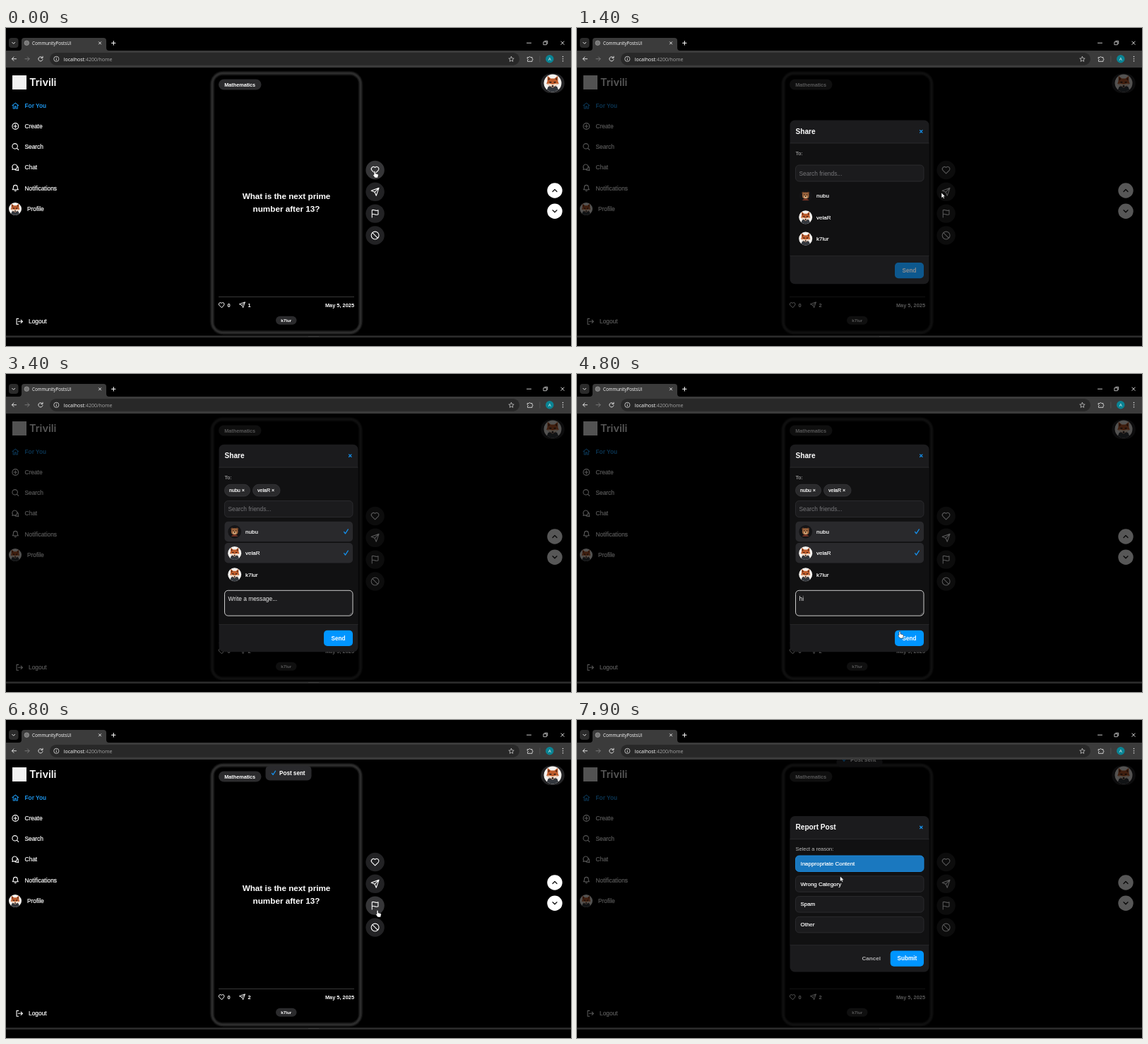
An HTML page that plays this animation: 800 px wide and 450 px high, repeating every 8000 ms.

```html
<!DOCTYPE html>
<html lang="en">
<head>
<meta charset="utf-8">
<title>Share and report a post</title>
<style>
html, body { margin: 0; width: 100%; height: 100%; overflow: hidden; background: #000; }
svg { display: block; width: 100vw; height: 100vh; font-family: "Liberation Sans", Arial, sans-serif; }
text { white-space: pre; }
.medium { stroke: currentColor; stroke-width: .2; color: #fff; }
</style>
</head>
<body>
<svg id="stage" viewBox="0 0 800 450" xmlns="http://www.w3.org/2000/svg"></svg>
<script>
const LOOP = 8000, STEP = 100;
const BLUE = '#0095ff';

// Drawing helpers
const text = (x, y, s, size, fill = '#fff', extra = '') =>
  `<text x="${x}" y="${y}" font-size="${size}" fill="${fill}" ${extra}>${s}</text>`;
const bold = (x, y, s, size, fill = '#fff', extra = '') =>
  text(x, y, s, size, fill, 'font-weight="700" ' + extra);
const medium = (x, y, s, size) => text(x, y, s, size, '#fff', 'class="medium"');
const rect = (x, y, w, h, r, fill, extra = '') =>
  `<rect x="${x}" y="${y}" width="${w}" height="${h}" rx="${r}" fill="${fill}" ${extra}/>`;
const disc = (x, y, r, fill, extra = '') =>
  `<circle cx="${x}" cy="${y}" r="${r}" fill="${fill}" ${extra}/>`;
const line = (d, color = '#fff', w = 1, extra = '') =>
  `<path d="${d}" fill="none" stroke="${color}" stroke-width="${w}" stroke-linecap="round" stroke-linejoin="round" ${extra}/>`;
const group = (id, body) => `<g id="${id}">${body}</g>`;
const MID = 'text-anchor="middle"';

// Icons on a 24 unit grid
const ICONS = {
  home: 'M2 11L12 3L22 11M5 9V21H10V14H14V21H19V9',
  create: 'M12 2A10 10 0 1 0 12 22A10 10 0 1 0 12 2M12 7V17M7 12H17',
  search: 'M10.5 2A8.5 8.5 0 1 0 10.5 19A8.5 8.5 0 1 0 10.5 2M17 17L22 22',
  chat: 'M10 2A8 8 0 0 0 3 14L2 19L7 17.5A8 8 0 1 0 10 2M19 9A7 7 0 0 1 21 17L22 22L17 20.5A8 8 0 0 1 10 19',
  bell: 'M3 17H21C18.5 14.5 18.5 13 18.5 9A6.5 6.5 0 0 0 5.5 9C5.5 13 5.5 14.5 3 17M9.5 20.5Q12 23 14.5 20.5',
  logout: 'M9 3H3V21H9M8 12H22M17 7L22 12L17 17',
  heart: 'M12 21L3.5 12.5A5.5 5.5 0 0 1 12 5.5A5.5 5.5 0 0 1 20.5 12.5Z',
  send: 'M22 2L15 22L11 13L2 9ZM22 2L11 13',
  flag: 'M4 22V3C9 0 13 7 20 3V14C13 18 9 11 4 14',
  block: 'M12 2A10 10 0 1 0 12 22A10 10 0 1 0 12 2M5 5L19 19',
  up: 'M6 15L12 9L18 15',
  down: 'M6 9L12 15L18 9',
  check: 'M4 13L9 20L20 3',
  cross: 'M5 5L19 19M19 5L5 19'
};
const icon = (name, x, y, size, color = '#fff', w = 2) =>
  line(ICONS[name], color, w, `transform="translate(${x - size / 2} ${y - size / 2}) scale(${size / 24})"`);

const fox = (x, y, r) => `<g transform="translate(${x} ${y}) scale(${r / 10})">
  ${disc(0, 0, 10, '#f4f2ef')}
  <path d="M-6.5 7.6L-5 4Q0 1.5 5 4L6.5 7.6Q0 12.4 -6.5 7.6Z" fill="#33373d"/>
  <path d="M-5.8 -8.2L-2 -5.2H2L5.8 -8.2L6 -2L7 .5L0 5.2L-7 .5L-6 -2Z" fill="#bf5c2b"/>
  <path d="M-6.6 .5L-3.4 .6L0 1.4L3.4 .6L6.6 .5L0 5.2Z" fill="#f3dfcc"/>
  <path d="M-5 -6.4L-3 -4.6L-5 -3ZM5 -6.4L3 -4.6L5 -3Z" fill="#4f2618"/>
  <path d="M-4 -1.6H-1.3V-.4H-3.2ZM4 -1.6H1.3V-.4H3.2Z" fill="#24191a"/>
  ${disc(0, 3.4, 1.1, '#24191a')}</g>`;

const bear = (x, y) => `<g transform="translate(${x} ${y})">
  ${disc(0, 0, 9.3, '#141416')}
  <path d="M-5 6.5Q0 1 5 6.5Z" fill="#7b3324"/>
  ${disc(-3.6, -4, 1.7, '#6e4026')}${disc(3.6, -4, 1.7, '#6e4026')}
  ${rect(-4.8, -5, 9.6, 9, 4, '#99623c')}
  ${rect(-2.6, -0.4, 5.2, 3.8, 1.9, '#d5aa7d')}
  ${disc(-2, -1.6, 0.7, '#20140f')}${disc(2, -1.6, 0.7, '#20140f')}${disc(0, 0.7, 0.9, '#20140f')}</g>`;

function browser() {
  return rect(0, 0, 800, 56, 0, '#000') +
    rect(0, 32, 800, 24, 0, '#3b3b3b') +
    rect(4, 14, 13.5, 14, 4, '#2b2b2b') + icon('down', 10.7, 21.3, 8, '#ddd', 3) +
    `<path d="M18 32Q22 32 22 28V18Q22 14 26 14H138Q142 14 142 18V28Q142 32 146 32Z" fill="#3b3b3b"/>` +
    disc(29.3, 21.2, 3.3, '#777', 'stroke="#aaa" stroke-width=".6"') +
    text(37, 23.6, 'CommunityPostsUI', 6.2, '#fff', 'font-family="Open Sans, sans-serif"') +
    icon('cross', 133, 21.3, 5.5, '#eee', 4) +
    line('M149.5 21.2H155M152.25 18.5V24', '#fff', 1.1) +
    line('M737.5 21.2H743.5', '#ddd', .9) +
    line('M761.3 19.7H765.3V23.7H761.3ZM762.7 18.3H766.7V22.3', '#ddd', .8) +
    icon('cross', 788, 21.2, 7.5, '#eee', 2.8) +
    line('M14.5 43.7H8.5M11 41L8.4 43.7L11 46.4', '#ddd', 1) +
    line('M27 43.7H33M30.5 41L33.1 43.7L30.5 46.4', '#777', 1) +
    line('M51.5 42A3.1 3.1 0 1 0 52 44.5M52 40.2V42.5H49.8', '#ddd', 1) +
    rect(62, 35, 665, 17.7, 8.8, '#282828') +
    disc(71.3, 43.8, 3.6, 'none', 'stroke="#ddd" stroke-width=".8"') +
    line('M71.3 43.6V45.5M71.3 41.9V42', '#ddd', .9) +
    `<text x="81.7" y="46.5" font-size="7" fill="#fff" font-family="Open Sans, sans-serif">localhost<tspan fill="#a5a5a5">:4200/home</tspan></text>` +
    line('M715.5 40.4L716.6 42.8L719.2 43.1L717.2 44.8L717.8 47.3L715.5 46L713.2 47.3L713.8 44.8L711.8 43.1L714.4 42.8Z', '#c7c7c7', .8) +
    line('M738.5 41.5H740.5Q741.5 39 742.5 41.5H745V43.5Q747.5 44.3 745 45.5V47.3H738.5V45.3Q740.5 44.4 738.5 43.5Z', '#ddd', .9) +
    rect(755.5, 39.5, .8, 9, 0, '#555') +
    disc(769.8, 43.7, 5.7, '#0a8494') + text(769.8, 45.9, 'A', 6, '#fff', MID) +
    [40.6, 43.7, 46.8].map(y => disc(788.5, y, .8, '#ddd')).join('');
}

function sidebar() {
  const items = [['create', 'Create', 139], ['search', 'Search', 168], ['chat', 'Chat', 197.3], ['bell', 'Notifications', 226.5]];
  return rect(9, 67, 20, 20, 0, '#f2f2f2') +
    text(33, 82, 'Trivili', 14.5, '#fff', 'font-family="Inter, sans-serif" font-weight="600"') +
    icon('home', 13.3, 110, 10.5, '#1d93e8', 2.5) + bold(26.5, 113, 'For You', 8.3, '#1d93e8') +
    items.map(([name, label, y]) => icon(name, 13.3, y, 10.5, '#fff', 2.5) + medium(26.5, y + 3, label, 8.35)).join('') +
    fox(13, 256, 9) + medium(30, 259, 'Profile', 8.35) +
    icon('logout', 19, 415.3, 10.5, '#fff', 2.5) + medium(32, 418.3, 'Logout', 8.4);
}

function card() {
  return `<filter id="soft" x="-10%" y="-10%" width="120%" height="120%"><feGaussianBlur stdDeviation="1"/></filter>` +
    rect(292, 64, 210, 367, 15, 'none', 'stroke="#303030" stroke-width="4" filter="url(#soft)"') +
    rect(301, 72.5, 60.5, 15, 7.5, '#2b2b2d') + bold(331.2, 82.6, 'Mathematics', 7.25, '#fff', MID) +
    bold(397, 242, 'What is the next prime', 11.7, '#fff', MID) +
    bold(397, 259.5, 'number after 13?', 11.7, '#fff', MID) +
    rect(301, 380, 192, .8, 0, '#484848') +
    icon('heart', 305.2, 392, 9.5, '#fff', 2.5) + bold(313.5, 394.6, '0', 7.4) +
    icon('send', 334.5, 392, 9, '#fff', 2.5) + bold(342.5, 394.6, '1', 7.4, '#fff', 'id="count"') +
    bold(493, 394.5, 'May 5, 2025', 7.4, '#fff', 'text-anchor="end"') +
    rect(382, 407.7, 29.5, 12, 6, '#2b2b2d') + bold(396.7, 415.9, 'k7lur', 6.2, '#fff', MID);
}

function actions() {
  return [['heart', 201], ['send', 231.8], ['flag', 262.6], ['block', 293.5]].map(([name, y]) =>
    disc(522.6, y, 13.2, '#222224', `id="btn-${name}"`) + icon(name, 522.6, y, 13, '#fff', 2)).join('') +
    [['up', 230], ['down', 259.3]].map(([name, y]) =>
      disc(777, y, 10.7, '#fff') + icon(name, 777, y, 12, '#111', 2.5)).join('') +
    rect(757.3, 64.5, 33.5, 27.5, 13.7, '#232325') + fox(774, 78, 12.5);
}

// Modal shell: header, body, footer
const shell = (top, bottom, foot, title) =>
  rect(301.5, top, 197, bottom - top, 7, '#1b1b1d') +
  rect(301.5, top + 32.5, 197, foot - top - 32.5, 0, '#111112') +
  rect(301.5, top + 32, 197, .8, 0, '#2e2e30') + rect(301.5, foot, 197, .8, 0, '#28282a') +
  bold(309.5, top + 19.4, title, 10.1) +
  icon('cross', 487.3, top + 15.9, 5.8, '#1594f2', 5);

const button = (x, y, w, label, opacity = 1) =>
  `<g opacity="${opacity}">${rect(x, y, w, 22.3, 5, BLUE) + bold(x + w / 2, y + 14, label, 8.2, '#fff', MID)}</g>`;
const field = (y, h, id = '') =>
  rect(309.5, y, 181.5, h, 5, '#1b1b1d', `stroke="#2d2d30" stroke-width=".9" ${id && `id="${id}"`}`);

function friends(y) {
  return [['nubu', bear], ['velaR', fox], ['k7lur', fox]].map(([name, face], i) => {
    const cy = y + i * 30.3;
    return face(323.7, cy, 9.5) + medium(339, cy + 2.8, name, 8.05);
  }).join('');
}
const picked = cy => rect(309.5, cy - 14.2, 181.5, 28.4, 5, '#29292c');
const tick = cy => icon('check', 481.5, cy, 8.5, '#1594f2', 3.5);
const tag = (x, w, name) =>
  rect(x, 156.3, w, 16.7, 8.3, '#2a2a2c', 'stroke="#3c3c3e" stroke-width=".7"') +
  medium(x + 6.5, 167, name + ' ×', 7.1);

const shareSmall = () => shell(130.5, 362.3, 322, 'Share') +
  text(309.5, 180.2, 'To:', 7.5, '#bbb') +
  field(194, 23) + text(314.5, 208.5, 'Search friends...', 8.35, '#77777a') +
  friends(237.5) + button(450, 332, 41, 'Send', .5);

const shareLarge = () => shell(99.7, 393.3, 354, 'Share') +
  text(309.5, 149, 'To:', 7.5, '#bbb') + tag(309.5, 36, 'nubu') +
  field(179.5, 23) + text(314.5, 193.8, 'Search friends...', 8.35, '#77777a') +
  picked(223) + tick(223) +
  group('second', tag(349.5, 38.5, 'velaR') + picked(253.3) + tick(253.3)) +
  friends(223.2) +
  field(306.3, 35.8, 'box') +
  line('M487 340.5L489.5 338M488.8 340.5L489.5 339.8', '#999', .6) +
  text(314.5, 321, '', 8.4, '#eee', 'id="message"') +
  rect(314.5, 313.5, .9, 9.5, 0, '#fff', 'id="caret"') +
  button(450, 362.7, 41, 'Send');

const report = () => shell(136, 356.5, 318, 'Report Post') +
  text(309.5, 184.5, 'Select a reason:', 7.45, '#bbb') +
  ['Inappropriate Content', 'Wrong Category', 'Spam', 'Other'].map((s, i) => {
    const y = 192 + i * 28.8;
    return field(y, 22.5, 'reason' + i) + medium(316.5, y + 13.8, s, 7.95);
  }).join('') +
  bold(416.7, 340, 'Cancel', 8.1, '#b0b0b2', MID) +
  group('submit', button(443.7, 326.4, 47.3, 'Submit'));

const toast = () => rect(367.5, 64.5, 65, 21, 6, '#2a2a2d') +
  icon('check', 379, 75, 7.5, '#1594f2', 4) + bold(387, 78, 'Post sent', 8.15);

const POINTERS = {
  arrow: '<path d="M0 0V7.6L1.8 6L3 8.6L4.3 8L3.1 5.5H5.5Z" fill="#fff" stroke="#000" stroke-width=".5"/>',
  hand: '<path d="M-1 .8Q0 -.6 1 .8V3.8L4.4 4.8Q5.4 5.2 5.2 6.4L4.4 10H.4L-2.3 6.4Q-2.5 5 -1 5.8Z" fill="#fff" stroke="#000" stroke-width=".5"/>',
  beam: '<path d="M-2 -4H2M-2 4H2M0 -4V4" stroke="#ddd" stroke-width=".8"/>'
};

const stage = document.getElementById('stage');
stage.innerHTML = rect(0, 0, 800, 450, 0, '#000') +
  sidebar() + card() + actions() + group('toast', toast()) +
  rect(0, 55, 800, 380, 0, '#000', 'id="shade" opacity=".66"') +
  group('shareSmall', shareSmall()) + group('shareLarge', shareLarge()) + group('report', report()) +
  browser() + rect(0, 435.3, 800, 2.7, 0, '#2b2b2b') + rect(428, 436, 15, 1, 0, '#383838') +
  Object.keys(POINTERS).map(k => group(k, POINTERS[k])).join('');

const $ = id => document.getElementById(id);
const show = (id, on) => $(id).setAttribute('display', on ? 'inline' : 'none');
const clamp = v => Math.max(0, Math.min(1, v));
const ease = v => v * v * (3 - 2 * v);

// time, x, y, pointer shape
const PATH = [
  [0, 522, 202, 'hand'], [100, 522, 218, 'arrow'], [200, 522, 218, 'hand'], [700, 521, 229, 'hand'],
  [1100, 518, 232, 'hand'], [1200, 516, 233, 'arrow'], [1400, 516, 233, 'arrow'], [1700, 425, 236, 'hand'],
  [1900, 428, 238, 'hand'], [2100, 435.5, 245, 'hand'], [2300, 432, 252, 'hand'], [2500, 430, 254, 'hand'],
  [2800, 415.5, 309, 'beam'], [3000, 415.5, 309, ''], [4400, 415.5, 309, 'beam'],
  [4700, 450, 355, 'hand'], [4800, 457, 364, 'hand'], [5100, 469.5, 373, 'hand'], [5400, 469.5, 373, 'arrow'],
  [5600, 469.5, 373, 'arrow'], [6300, 524, 285, 'hand'], [6800, 526, 269, 'hand'], [7100, 526, 269, 'arrow'],
  [7200, 524, 268, 'arrow'], [7600, 392, 206, 'hand'], [7700, 386, 206, 'hand'], [7900, 372.5, 221, 'arrow']
];

function pointer(t) {
  let i = PATH.length - 1;
  while (PATH[i][0] > t) i--;
  const a = PATH[i], b = PATH[i + 1] || a;
  const k = b === a ? 0 : ease((t - a[0]) / (b[0] - a[0]));
  const x = a[1] + (b[1] - a[1]) * k, y = a[2] + (b[2] - a[2]) * k;
  for (const kind in POINTERS) {
    show(kind, kind === a[3]);
    $(kind).setAttribute('transform', `translate(${x} ${y})`);
  }
}

function render(t) {
  const within = (a, b) => t >= a && t < b;
  const hover = (name, on) => $('btn-' + name).setAttribute('fill', on ? '#363638' : '#222224');
  hover('heart', t < 300);
  hover('send', within(400, 1200));
  hover('flag', within(6500, 7100));
  $('count').textContent = t < 900 ? '1' : '2';

  show('shade', within(1200, 5400) || t >= 7100);
  show('shareSmall', within(1200, 1900));
  show('shareLarge', within(1900, 5400));
  show('report', t >= 7100);

  show('second', t >= 2500);
  $('box').setAttribute('stroke', t >= 2900 ? '#e0e0e0' : '#2d2d30');
  $('message').textContent = t < 3600 ? 'Write a message...' : t < 4000 ? 'h' : 'hi';
  $('caret').setAttribute('x', t < 3600 ? 314.5 : t < 4000 ? 319.3 : 321.3);
  show('caret', within(2900, 3400) || within(3600, 4500) || within(5000, 5400));

  const enter = ease(clamp((t - 5500) / 400)), leave = clamp((t - 7500) / 600);
  show('toast', t >= 5600);
  $('toast').setAttribute('transform', `translate(0 ${-32 * (1 - enter) - 43 * leave * leave})`);

  const chosen = t >= 7700;
  $('reason0').setAttribute('fill', chosen ? '#1a78bf' : '#1b1b1d');
  $('reason0').setAttribute('stroke', chosen ? '#1b8ee2' : '#2d2d30');
  $('submit').setAttribute('opacity', chosen ? 1 : .5);
  pointer(t);
}

function play(now) {
  render(Math.floor((now % LOOP) / STEP) * STEP);
  requestAnimationFrame(play);
}
render(0);
requestAnimationFrame(play);
</script>
</body>
</html>
```
